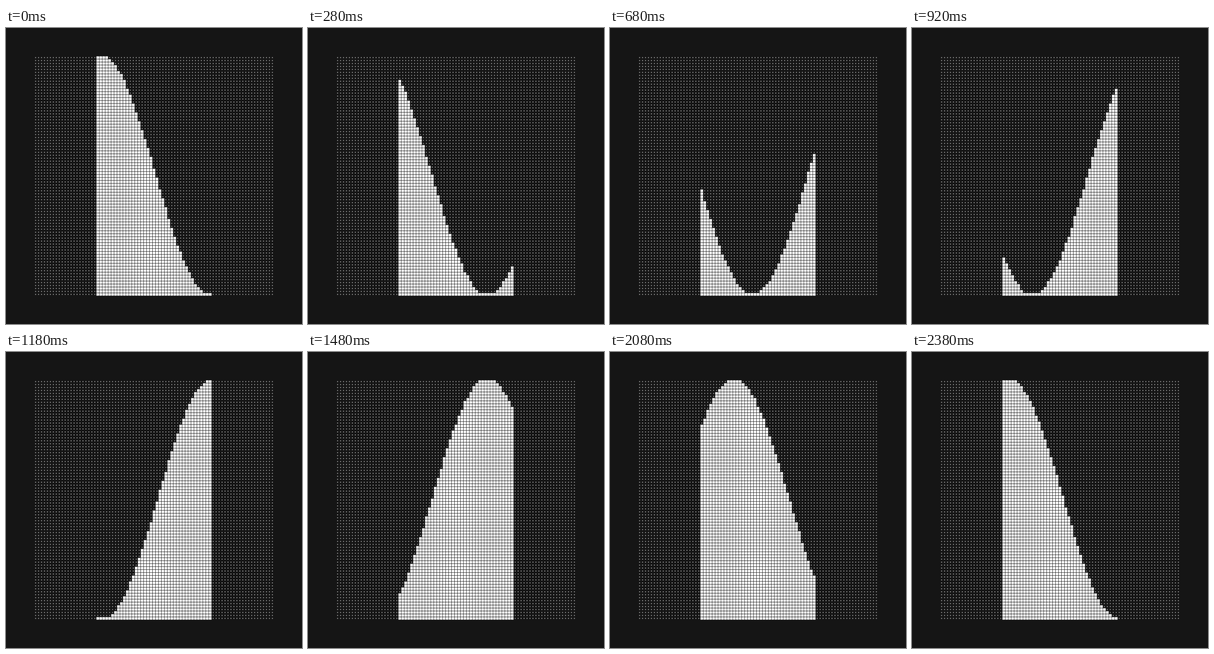
Recreate the animation shown at these times as an HTML page with a canvas. Size 500 px wide and 500 px high, loop 2.4 s.

```html
<!DOCTYPE html>
<html lang="en">
<head>
<meta charset="utf-8">
<title>Wave grid</title>
<style>
  html, body { margin: 0; width: 100%; height: 100%; overflow: hidden; background: #151515; }
  canvas { display: block; width: 500px; height: 500px; }
</style>
</head>
<body>
<canvas id="stage" width="500" height="500"></canvas>
<script>
const ctx = document.getElementById('stage').getContext('2d');

const PITCH = 5, ORIGIN = 50, COUNT = 81;    // grid of dots
const FIRST = 21, COLUMNS = 39;              // columns that carry the wave
const DOT = 1.2, CELL = 4.4;
const STEP = 20, STEPS = 120;                // 2400 ms loop
const RAD = Math.PI / 180;
const DEG_PER_COLUMN = 4.81, START = 87;

function square(col, row, size) {
  ctx.fillRect(ORIGIN + col * PITCH - size / 2, ORIGIN + row * PITCH - size / 2, size, size);
}

// First filled row of each wave column; outside the wave nothing is filled.
function topRow(col, step) {
  const i = col - FIRST;
  if (i < 0 || i >= COLUMNS) return COUNT;
  const phase = START + step * 360 / STEPS + (i - (COLUMNS - 1) / 2) * DEG_PER_COLUMN;
  const row = Math.floor((1 - Math.cos(phase * RAD)) * COUNT / 2);
  return Math.min(row, COUNT - 1);
}

function draw(step) {
  ctx.fillStyle = '#151515';
  ctx.fillRect(0, 0, 500, 500);
  ctx.fillStyle = '#fff';
  for (let col = 0; col < COUNT; col++) {
    const top = topRow(col, step);
    for (let row = 0; row < COUNT; row++) square(col, row, row < top ? DOT : CELL);
  }
}

const begin = performance.now();
let shown = -1;

function tick() {
  const step = Math.floor((performance.now() - begin) / STEP) % STEPS;
  if (step !== shown) draw(shown = step);
  requestAnimationFrame(tick);
}
tick();
</script>
</body>
</html>
```
